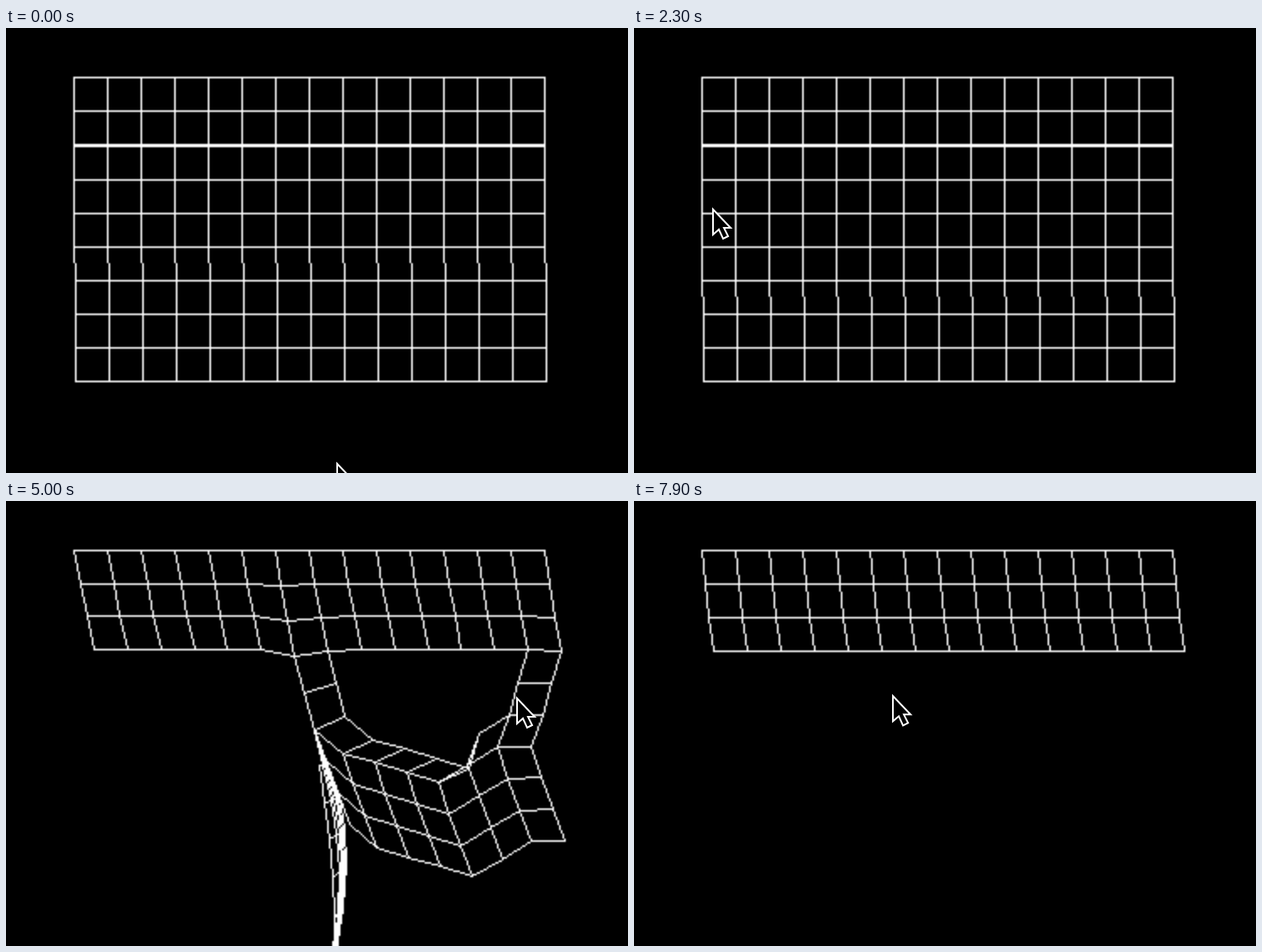
These frames come from a looping animation (740 px wide and 530 px high, 8000 ms). An HTML page with a canvas:

```html
<!DOCTYPE html>
<html lang="en">
<head>
<meta charset="utf-8">
<title>Tearing cloth</title>
<style>
html, body { margin: 0; width: 100%; height: 100%; overflow: hidden; background: #000; }
canvas { display: block; }
</style>
</head>
<body>
<canvas id="stage" width="740" height="530"></canvas>
<script>
const LOOP = 8000, STEP = 100, COLS = 15, ROWS = 10, SCALE = 2;
const SWING = 2800, RIGHT_CUT = 5150, LEFT_CUT = 5800;

// The cloth is drawn at half size and smoothly enlarged.
const ctx = document.getElementById('stage').getContext('2d');
const cloth = document.createElement('canvas');
cloth.width = 740 / SCALE;
cloth.height = 530 / SCALE;
const pixels = cloth.getContext('2d');

const ramp = (t, from, to) => Math.min(1, Math.max(0, (t - from) / (to - from)));
const mix = (a, b, p) => a.map((v, i) => v + (b[i] - v) * p);

// Interpolates keys of the form [position, ...values].
function track(keys, at) {
  const i = keys.findIndex(k => k[0] > at);
  if (i < 0) return keys[keys.length - 1].slice(1);
  if (i === 0) return keys[0].slice(1);
  const a = keys[i - 1], b = keys[i];
  return mix(a, b, ramp(at, a[0], b[0])).slice(1);
}

function bezier(points, p) {
  if (points.length === 1) return points[0];
  return bezier(points.slice(1).map((q, i) => mix(points[i], q, p)), p);
}

// Swings from a to b around a pivot instead of along a straight line.
function swing(a, b, [px, py], p) {
  const polar = ([x, y]) => [Math.atan2(y - py, x - px), Math.hypot(x - px, y - py)];
  const [angle, radius] = mix(polar(a), polar(b), p);
  return [px + Math.cos(angle) * radius, py + Math.sin(angle) * radius];
}

const pointerPath = [
  [0, 394, 519], [900, 79, 235], [2300, 94, 216], [2700, 88, 228], [4200, 427, 229],
  [5000, 608, 235], [5200, 645, 236], [5800, 390, 238], [6200, 309, 238], [8000, 308, 232]
];
const shearKeys = [[2800, 0], [4200, 4], [5000, 24], [5400, 21], [6200, 14]];
const dipKeys = [[2800, 0], [4200, 1], [5800, 1], [6200, 0]];

// ridge: row 6 by column; drape: step to each lower row;
// fold: step up to row 5 for columns before foldEnd;
// outer, inner: the edges of the torn tail.
const snag = {
  time: 4200,
  ridge: [[7, 348, 266], [8, 368, 304], [9, 406, 297], [14, 609, 297]],
  drape: [-2, 40], fold: [38, -7], foldEnd: 9,
  outer: [[348, 266], [330, 400], [380, 490], [468, 534]],
  inner: [[348, 266], [360, 400], [410, 420], [512, 520]]
};
const sag = {
  time: 5000,
  ridge: [[7, 367, 272], [8, 400, 300], [11, 514, 335], [13, 584, 293], [14, 624, 292]],
  drape: [13.7, 37.5], fold: [36, -16], foldEnd: 12,
  outer: [[367, 272], [376, 360], [400, 440], [388, 550]],
  inner: [[367, 272], [405, 370], [418, 400], [390, 550]]
};

// Rows 0 to 3 stay attached and only shear and dip.
function bandNode(c, r, t) {
  const [shear] = track(shearKeys, t), [dip] = track(dipKeys, t);
  const dx = shear - dip * 4 * c / 14;
  const lift = 1.5 * Math.min(1, dx / 2) + 0.25 * Math.max(0, dx - 14);
  const pull = c === 6 ? 1 : c === 7 ? 0.3 : 0;
  const y = 59 + 40 * r + (r > 1 ? 2 - lift : 0);
  return [81 + 40 * c + dx * [0, 0.31, 0.63, 1][r], y + pull * dip * 2.4 * r];
}

function restNode(c, r, t) {
  const jog = r >= (t < 1500 ? 6 : 7) ? 2 : 0;
  return [81 + 40 * c + jog, 61 + 40 * r];
}

function poseNode(pose, c, r) {
  if (c < 6 || (c === 6 && r > 4)) {
    const along = (6 - c) / 6, across = Math.sqrt((r - 4) / 5);
    return mix(bezier(pose.outer, along), bezier(pose.inner, along), across);
  }
  if (r === 4) return mix(bandNode(c, 3, pose.time), poseNode(pose, c, 5), 0.5);
  const [x, y] = track(pose.ridge, c), [dx, dy] = pose.drape;
  if (r > 5) return [x + dx * (r - 6), y + dy * (r - 6)];
  const [fx, fy] = c < pose.foldEnd ? pose.fold : [14, -38];
  return [x + fx, y + fy];
}

const hangNode = (c, r) => [392 - 5 * (r - 5), 262 + 38 * (c - 7) + 6 * (r - 5)];

function node(c, r, t) {
  if (r < 4) return bandNode(c, r, t);
  if (t < snag.time) {
    const p = ramp(t, SWING, snag.time);
    const from = restNode(c, r, t), to = poseNode(snag, c, r);
    const loose = c < 6 || (c === 6 && r > 5);
    return loose ? swing(from, to, [340, 200], p ** 1.3) : mix(from, to, p * p);
  }
  let point = mix(poseNode(snag, c, r), poseNode(sag, c, r), ramp(t, snag.time, sag.time));
  const drop = ramp(t, RIGHT_CUT, LEFT_CUT);
  if (c > 7 || (c === 7 && r > 4)) {
    point = swing(point, hangNode(c, r), [402, 200], drop ** 1.5);
  }
  const fall = Math.max(0, t - LEFT_CUT) / 1000;
  return [point[0] - 20 * drop, point[1] + 480 * fall * fall];
}

// When the pointer cuts a column below the band.
function cutTime(c) {
  if (c > 12) return RIGHT_CUT;
  if (c === 6 || c === 7) return LEFT_CUT;
  return 2700 + 165 * c;
}
const shredded = (c, t) => c > 7 && c < 13 && t >= cutTime(c);

function line(from, to) {
  const [a, b] = [from, to].map(point => point.map(v => Math.floor(v / SCALE)));
  const n = Math.max(Math.abs(b[0] - a[0]), Math.abs(b[1] - a[1]), 1);
  for (let i = 0; i <= n; i++) {
    const [x, y] = mix(a, b, i / n);
    pixels.fillRect(Math.round(x), Math.round(y), 1, 1);
  }
}

function drawCloth(t) {
  pixels.fillStyle = '#000';
  pixels.fillRect(0, 0, cloth.width, cloth.height);
  pixels.fillStyle = '#fff';
  const grid = Array.from({ length: ROWS }, (_, r) =>
    Array.from({ length: COLS }, (_, c) => node(c, r, t)));
  for (let r = 0; r < ROWS; r++) {
    for (let c = 0; c < COLS; c++) {
      const acrossCut = r === 4 &&
        (shredded(c, t) || shredded(c + 1, t) || (c === 5 && t >= cutTime(5)));
      if (c < COLS - 1 && !acrossCut) line(grid[r][c], grid[r][c + 1]);

      const downCut = (r === 3 && t >= cutTime(c)) || (r === 4 && shredded(c, t));
      if (r < ROWS - 1 && !downCut) line(grid[r][c], grid[r + 1][c]);
    }
  }
  if (t < SWING) line([81, 139], [641, 139]);
  ctx.drawImage(cloth, 0, 0, 740, 530);
}

const arrow = new Path2D('M0 0V30L7 24L12 35L18 32L13 22H21Z');
function drawPointer(t) {
  const [x, y] = track(pointerPath, t);
  ctx.save();
  ctx.translate(x, y);
  ctx.fillStyle = '#000';
  ctx.strokeStyle = '#fff';
  ctx.lineWidth = 2;
  ctx.fill(arrow);
  ctx.stroke(arrow);
  ctx.restore();
}

const start = performance.now();
function tick() {
  const elapsed = performance.now() - start;
  const t = Math.floor((elapsed % LOOP) / STEP) * STEP;
  drawCloth(t);
  drawPointer(t);
  requestAnimationFrame(tick);
}
tick();
</script>
</body>
</html>
```
